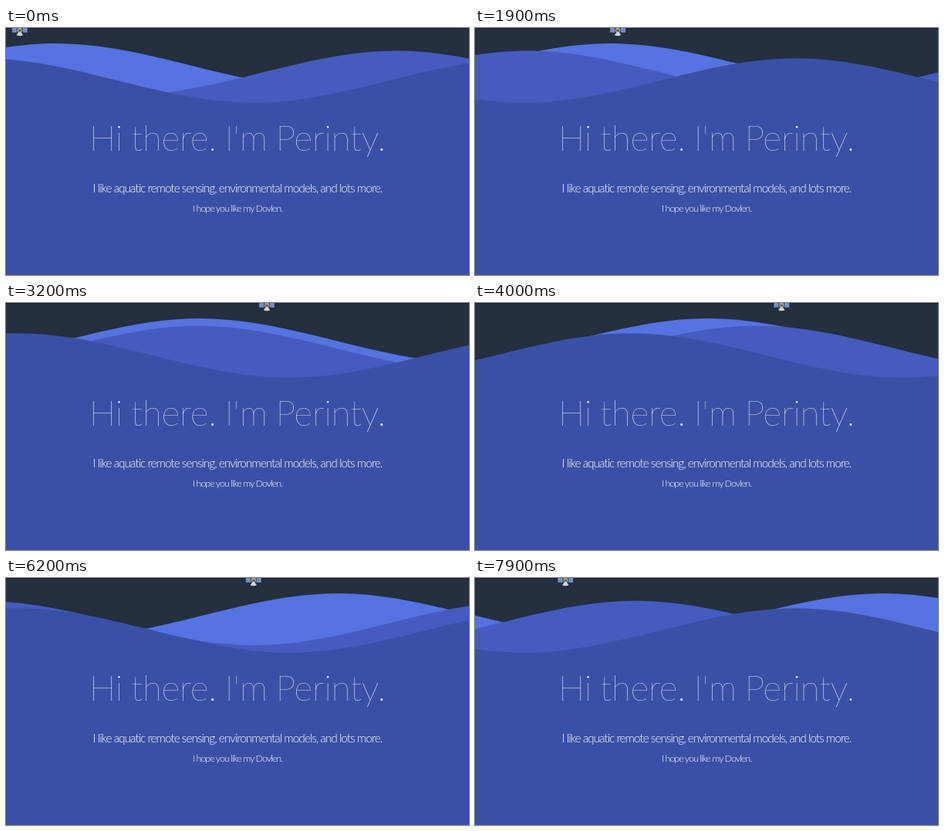
An HTML page with a canvas that plays this animation: 600x320 px, repeating every 8 s.

```html
<!DOCTYPE html>
<html lang="en">
<head>
<meta charset="utf-8">
<title>Waves</title>
<style>
  html, body { margin: 0; width: 100%; height: 100%; overflow: hidden; background: #3a50a6; }
  canvas { position: absolute; left: 0; top: 0; }
  p {
    position: absolute; left: 0; width: 600px; margin: 0;
    text-align: center; white-space: nowrap; color: #fff;
    font-family: Lato, sans-serif; letter-spacing: -1px;
  }
  .title {
    top: 114px; font-size: 46px; line-height: 56px; font-weight: 100;
    letter-spacing: -0.3px; word-spacing: -2px;
  }
  .lead { top: 197px; font-size: 15.4px; line-height: 20px; font-weight: 300; }
  .note { top: 224px; font-size: 12.5px; line-height: 20px; font-weight: 300; }
</style>
</head>
<body>
<canvas id="stage" width="600" height="320"></canvas>
<p class="title">Hi there. I'm Perinty.</p>
<p class="lead">I like aquatic remote sensing, environmental models, and lots more.</p>
<p class="note">I hope you like my Dovlen.</p>
<script>
const ctx = document.getElementById('stage').getContext('2d');
const LOOP = 8000, STEP = 100, START = 54.785;

// back to front; y and x are in wave units of 4 by 3.2 px
const waves = [
  { y: 0, period: 12, lead: 2, fill: '#5573e1' },
  { y: 3, period: 5, lead: 2, fill: '#455bbf' },
  { y: 6, period: 3, lead: 4, fill: '#3a50a6' }
];

function drawWave({ y, period, lead, fill }, t) {
  const p = ((START + t + lead) % period) / period;
  let x = -200 + 175 * p;
  ctx.save();
  ctx.translate(0, 13.6);
  ctx.scale(4, 3.2);
  ctx.beginPath();
  ctx.moveTo(x, 20 + y);
  for (let i = 0; i < 4; i++, x += 88) {
    const from = y + (i % 2 ? 2 : 20), to = y + (i % 2 ? 20 : 2);
    ctx.bezierCurveTo(x + 30, from, x + 58, to, x + 88, to);
  }
  ctx.lineTo(x, 100);
  ctx.lineTo(x - 352, 100);
  ctx.fillStyle = fill;
  ctx.fill();
  ctx.restore();
}

function box(color, x, y, w, h) {
  ctx.fillStyle = color;
  ctx.fillRect(x, y, w, h);
}

function drawSatellite(t) {
  ctx.save();
  ctx.translate(212 - 200 * Math.cos(Math.PI * (t + 0.385) / 5), 0);
  box('#8b929c', -4, 2.5, 8, 1.5);
  for (const x of [-10, 3.8]) {
    box('#5a74a4', x, 0, 6.2, 6);
    for (const dx of [0.7, 3.4]) {
      box('#8ca6d0', x + dx, 0.6, 2.1, 2);
      box('#7f9ac8', x + dx, 3.3, 2.1, 2);
    }
  }
  box('#a39f98', -2.8, 0, 5.6, 5);
  box('#4d4a48', -1.8, 2.5, 3.6, 1.8);
  ctx.fillStyle = '#cfd0ce';
  ctx.beginPath();
  ctx.moveTo(-1.5, 5);
  ctx.lineTo(1.5, 5);
  ctx.lineTo(4.2, 9.2);
  ctx.quadraticCurveTo(0, 11.2, -4.2, 9.2);
  ctx.fill();
  ctx.restore();
}

function draw(now) {
  const t = Math.floor((now % LOOP) / STEP) * STEP / 1000;
  box('#242f3f', 0, 0, 600, 320);
  box('#1b2031', 0, 0, 600, 1);
  waves.forEach(w => drawWave(w, t));
  drawSatellite(t);
  requestAnimationFrame(draw);
}
draw(0);
</script>
</body>
</html>
```
